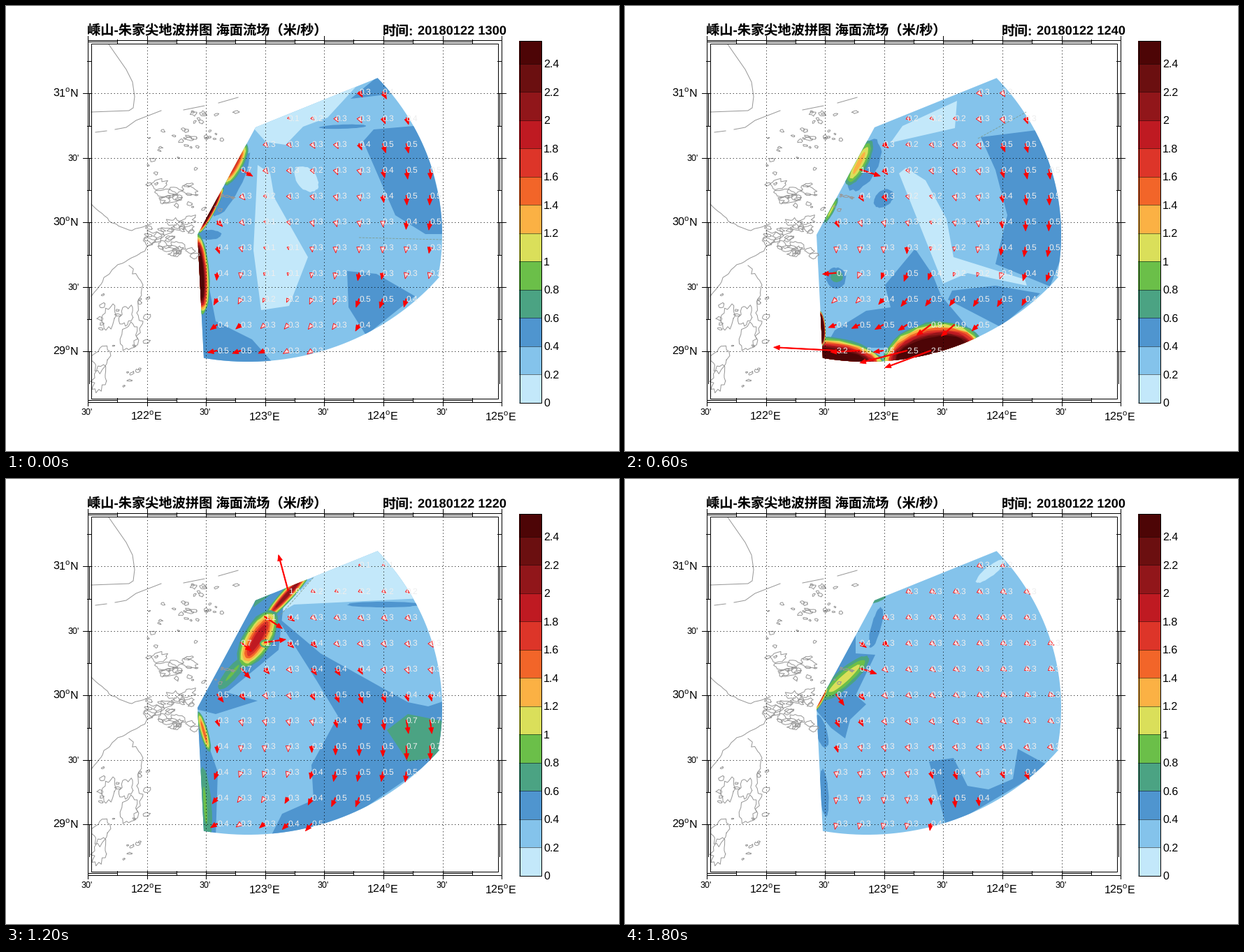
Animation of 877x638 px, one loop 2100 ms. Source, as a matplotlib script:

```python
import math
import random

import matplotlib.pyplot as plt
import numpy as np
from matplotlib.animation import ArtistAnimation
from matplotlib.collections import PolyCollection
from matplotlib.patches import Polygon, Rectangle

W, H, DPI = 877, 638, 64
PT = 72 / DPI
plt.rcParams.update({
    "font.family": ["Liberation Sans", "Noto Sans CJK JP"], "mathtext.fontset": "custom",
    "mathtext.rm": "Liberation Sans", "text.hinting": "none", "toolbar": "None",
})
COLORS = ["#c3e8fa", "#84c3eb", "#4f95cf", "#4ba383", "#6bbf49", "#dadf5a", "#fbb144",
          "#f26529", "#dd3529", "#bf1a22", "#91161a", "#6b0f10", "#4d0506"]
TOP = len(COLORS) - 1
GREY = "#979797"

fig = plt.figure(figsize=(W / DPI, H / DPI), dpi=DPI, facecolor="white")
ax = fig.add_axes([0, 0, 1, 1])
ax.set(xlim=(0, W), ylim=(H, 0))
ax.axis("off")
rng = random.Random(8)


def pairs(v):
    return np.array(v, float).reshape(-1, 2)


def line(*v, color="black", lw=1.0, z=5, **kw):
    p = pairs(v)
    return ax.plot(p[:, 0], p[:, 1], color=color, lw=lw * PT, zorder=z, **kw)


def text(x, y, s, px, ha="left", z=8, **kw):
    return ax.text(x, y, s, fontsize=px * PT, ha=ha, va="center_baseline", zorder=z, **kw)


def oval(x, y, rx, ry, tilt=0, rough=0.0, n=32):
    t = np.linspace(0, 2 * np.pi, n, endpoint=False)
    r = np.array([1 + rng.uniform(-rough, rough) for _ in t])
    c, s = math.cos(math.radians(tilt)), math.sin(math.radians(tilt))
    u, v = rx * r * np.cos(t), ry * r * np.sin(t)
    return np.column_stack([x + c * u - s * v, y + s * u + c * v])


# ---- coast ----
def coast(*v, wobble=0.0):
    p = pairs(v)
    out = []
    for a, b in zip(p, p[1:]):
        n = max(1, int(np.hypot(*(b - a)) / 5)) if wobble else 1
        for i in range(n):
            w = wobble if i else 0
            out += list(a + (b - a) * i / n + [rng.uniform(-w, w), rng.uniform(-w, w)])
    line(*out, *p[-1], color=GREY, z=4)


def islands(count, x, y, spread_x, spread_y, size):
    for _ in range(count):
        rx = size * rng.uniform(.3, 1)
        p = oval(rng.uniform(x - spread_x, x + spread_x), rng.uniform(y - spread_y, y + spread_y),
                 rx, rx * rng.uniform(.35, .8), rng.uniform(-30, 30), .4, 6 + int(rx))
        line(*p.flat, *p[0], color=GREY, z=4)


def draw_coast():
    coast(147, 55, 172, 91, 181, 109, 184, 130, 182, 146, 176, 150, 122, 152)
    coast(128, 181, 144, 179)
    coast(156, 177, 172, 174, 186, 164, 222, 150)
    coast(254, 149, 284, 143)
    coast(304, 139, 332, 131)
    coast(122, 284, 152, 311, 180, 322, 208, 312, wobble=1)
    coast(222, 330, 190, 356, 152, 378, 122, 416, wobble=2)
    coast(176, 372, 196, 400, 187, 440, 196, 452, 184, 488, wobble=3)
    for x, y, r in ((148, 446, 11), (172, 444, 10), (177, 474, 13), (136, 505, 14), (134, 535, 12)):
        p = oval(x, y, r * .8, r * 1.4, 15, .3, 20)
        coast(*p.flat, *p[0], wobble=1)
    islands(9, 242, 268, 26, 16, 13)
    islands(26, 236, 333, 36, 28, 11)
    islands(22, 290, 175, 45, 28, 5)
    islands(26, 255, 235, 55, 60, 4)
    islands(14, 165, 450, 40, 40, 5)
    islands(6, 182, 535, 14, 16, 4)
    islands(5, 315, 272, 12, 5, 4)


# ---- frame, grid and colour scale ----
def lon(d):
    return 116 + (d - 121.5) * 169.2


def lat(d):
    return 124 + (31 - d) * 185.2


def box(x0, y0, x1, y1):
    ax.add_patch(Rectangle((x0, y0), x1 - x0, y1 - y0, fill=False, lw=PT, ec="black", zorder=6))


def draw_map():
    box(116.5, 48.5, 708.5, 567.5)
    box(121.5, 53.5, 703.5, 562.5)
    dots = dict(lw=1, ls=(0, (1, 3.6)), z=5)
    for i in range(8):
        x = round(lon(121.5 + i / 2)) + .5
        line(x, 562, x, 573)
        line(x, 43, x, 54)
        if 0 < i < 7:
            line(x, 54, x, 562, **dots)
        if i < 7:
            m = x + 42.5
            line(m, 562, m, 568)
            line(m, 48, m, 54)
            for y in (51, 565):
                line(x, y, m, y)
        if i % 2:
            text(x - 1, 587, rf"{121.5 + i / 2:.0f}$^{{\rm o}}$E", 16, "center")
        else:
            text(x - 1, 581, "30'", 12.5, "center")
    for i in range(5):
        y = round(lat(31 - i / 2)) + .5
        line(110, y, 122, y)
        line(703, y, 715, y)
        line(122, y, 703, y, **dots)
        for x in (119, 706):
            line(x, y, x, y + 46)
            line(x - 3, y - 46, x + 3, y - 46)
        if i % 2:
            text(105, y, "30'", 12.5, "right")
        else:
            text(104, y - 1, rf"{31 - i / 2:.0f}$^{{\rm o}}$N", 16, "right")


def draw_scale():
    for k, c in enumerate(COLORS):
        y = 568.5 - 40.5 * k
        top = max(49.5, y - 40.5)
        ax.add_patch(Rectangle((734, top), 32, y - top, fc=c, ec="none"))
        line(734, y, 766, y, lw=.5)
        text(769, y, f"{k / 5:g}", 16)
    box(734.5, 49.5, 765.5, 568.5)


# ---- radar sector: two stations, two range arcs ----
def arc(x, y, rx, ry, t0, t1):
    t = np.radians(np.linspace(t0, t1, 40))
    return np.column_stack([x + rx * np.cos(t), y + ry * np.sin(t)])


SECTOR = np.vstack([[(274, 328), (357, 174)], arc(274, 328, 350, 332, -42.6, 10.4),
                    arc(346, 174, 356, 336, 39.6, 100.2)])
sector = ax.add_patch(Polygon(SECTOR, fc="none", ec="none"))
SHORE, WEST = -62, 86  # tilt of the two landward edges
art, layers = [], []


def fill(k, p, speed=None):
    patch = ax.add_patch(Polygon(p, fc=COLORS[k], ec="none", zorder=2))
    patch.set_clip_path(sector)
    art.append(patch)
    layers.append((patch.get_path(), speed or .2 * k + .1))


def area(k, *v):
    fill(k, pairs(v))


def blob(k, x, y, rx, ry, tilt=0):
    fill(k, oval(x, y, rx, ry, tilt, .05))


def hill(x, y, rx, ry, tilt, speed, core=.25):
    """Nested bands rising to a fast core."""
    top = min(TOP, int(speed * 5 + .01))
    for k in range(3, top + 1):
        s = 1 - (1 - core) * (k - 3) / max(1, top - 3)
        fill(k, oval(x, y, rx * s ** .5, ry * s, tilt, .03), speed if k == top else None)


def seam(*v):
    art.extend(line(*v, color="#7d9a8c", lw=.8, z=3, ls=(0, (4, 2))))


def speed_at(x, y):
    def top_layer(px, py):
        return next(s for path, s in reversed(layers) if path.contains_point((px, py)))

    here = top_layer(x, y)
    if here > .6:
        return here
    ring = [top_layer(*(p + (sector_mid - p) * .02)) for p in oval(x, y, 22, 22, n=8)
            if sector.get_path().contains_point(p + (sector_mid - p) * .02)]
    return np.mean([here, here] + [min(s, .7) for s in ring])


sector_mid = SECTOR.mean(axis=0)


def t1300():
    area(0, 354, 175, 506, 110, 460, 160, 425, 173, 400, 199, 372, 195)
    area(0, 360, 228, 378, 240, 384, 275, 432, 360, 405, 430, 365, 436, 354, 350)
    blob(0, 430, 248, 21, 14, 50)
    area(2, 532, 101, 552, 126, 493, 133)
    blob(2, 482, 173, 34, 3, -2)
    area(2, 595, 171, 526, 177, 511, 194, 557, 300, 600, 327, 632, 327)
    area(2, 488, 380, 530, 384, 585, 416, 515, 472, 490, 432)
    area(2, 276, 405, 290, 400, 300, 452, 352, 478, 384, 514, 280, 514)
    blob(2, 290, 328, 18, 7)
    blob(2, 322, 256, 52, 13, SHORE)
    hill(328, 227, 34, 11, SHORE, 1.7)
    hill(293, 293, 38, 6, SHORE, 2.6)
    hill(277, 384, 58, 14, WEST, 2.6, .4)
    seam(505, 332, 624, 335)


def t1250():
    area(0, 450, 173, 541, 111, 592, 171)
    area(2, 354, 176, 532, 100, 541, 112, 440, 148)
    area(3, 468, 132, 532, 100, 541, 112)
    area(2, 401, 178, 595, 175, 625, 260, 545, 272, 510, 215, 410, 190)
    area(2, 500, 292, 625, 260, 640, 330, 560, 455, 482, 352)
    area(3, 618, 262, 640, 320, 620, 395, 578, 405, 619, 310)
    area(3, 511, 405, 605, 410, 545, 458)
    area(0, 395, 236, 412, 248, 440, 315, 440, 390, 400, 450, 370, 460, 362, 514, 278, 514, 278, 435,
         338, 406, 300, 362, 325, 350, 285, 330, 310, 312, 350, 318, 368, 278)
    area(0, 280, 318, 330, 238, 380, 250, 350, 300)
    blob(0, 448, 325, 50, 7, 60)
    hill(296, 287, 45, 9, SHORE, 2.6)
    hill(283, 376, 40, 18, 42, 2.6)
    hill(282, 417, 17, 9, WEST, .9)
    seam(483, 291, 540, 279, 616, 260)


def t1240():
    area(2, 509, 188, 605, 176, 640, 320, 608, 402, 530, 370, 547, 300, 530, 235)
    area(2, 468, 408, 530, 401, 594, 412, 537, 460, 462, 421)
    area(0, 380, 196, 397, 172, 475, 136, 472, 175)
    area(0, 392, 240, 402, 232, 430, 250, 460, 305, 470, 360, 572, 392, 575, 401, 490, 383, 455, 398)
    area(2, 415, 348, 440, 385, 452, 415, 500, 472, 470, 490, 286, 490, 300, 465, 345, 437, 380, 432, 372, 400)
    blob(2, 341, 228, 40, 20, SHORE)
    hill(335, 225, 36, 12, SHORE, 1.3)
    hill(295, 293, 20, 4, SHORE, 1.1)
    blob(2, 370, 276, 16, 11, -40)
    blob(2, 302, 390, 14, 15)
    blob(3, 303, 388, 9, 8)
    hill(440, 500, 72, 46, -12, 2.5, .55)
    hill(288, 510, 84, 35, 5, 3.2, .55)
    hill(279, 462, 26, 8, WEST, 2.6, .7)
    seam(505, 190, 574, 152)


def t1230():
    area(0, 350, 176, 455, 135, 443, 158, 567, 143, 620, 229, 500, 212, 372, 184)
    area(2, 418, 195, 614, 228, 640, 320, 620, 395, 530, 462, 482, 430, 497, 380, 570, 396, 593, 385,
         585, 345, 530, 292, 450, 240)
    area(3, 538, 219, 614, 228, 640, 300, 628, 348, 585, 295)
    area(2, 276, 420, 300, 420, 328, 455, 302, 514, 278, 514)
    blob(3, 283, 505, 14, 12, 45)
    area(2, 345, 514, 372, 470, 405, 443, 440, 450, 475, 492, 430, 508)
    blob(2, 313, 325, 40, 13, -6)
    blob(2, 335, 292, 32, 9, -20)
    blob(2, 322, 252, 70, 24, SHORE)
    hill(335, 218, 28, 10, SHORE, 1.5)
    hill(303, 276, 34, 8, SHORE, 2.2)


def t1220():
    area(0, 385, 196, 445, 136, 532, 100, 596, 171, 412, 180)
    blob(2, 540, 180, 52, 4)
    area(2, 385, 195, 450, 250, 575, 320, 604, 326, 640, 314, 620, 398, 495, 484, 378, 514, 395, 480,
         440, 460, 437, 410, 475, 340, 445, 290)
    area(3, 545, 360, 575, 337, 640, 350, 620, 398, 575, 405)
    area(2, 357, 172, 400, 152, 390, 245, 316, 306, 360, 318, 300, 337, 272, 330)
    area(3, 356, 174, 382, 163, 354, 184)
    hill(404, 164, 54, 9, -48, 2.0)
    hill(324, 278, 30, 9, -50, .9)
    hill(360, 229, 46, 21, -60, 1.9)
    hill(371, 236, 8, 6, 0, 1.3)
    area(2, 272, 331, 303, 420, 300, 514, 280, 514)
    hill(285, 468, 54, 9, WEST, .9)
    hill(283, 362, 30, 6, 74, 1.5)
    seam(390, 198, 440, 141)


def t1210():
    area(0, 379, 178, 390, 160, 438, 140, 470, 180, 420, 185)
    area(0, 468, 181, 572, 147, 602, 193)
    blob(2, 337, 243, 72, 38, SHORE)
    area(2, 274, 328, 375, 292, 342, 335, 312, 370)
    hill(312, 257, 82, 34, SHORE, 2.6)
    area(2, 272, 335, 302, 405, 328, 455, 318, 514, 278, 514)
    blob(3, 282, 425, 32, 9, WEST)
    hill(280, 368, 25, 9, WEST, 1.3)
    area(2, 368, 432, 400, 440, 445, 405, 465, 340, 500, 345, 525, 402, 612, 406, 537, 464, 362, 516)


def t1200():
    blob(0, 523, 132, 26, 7, -38)
    blob(2, 359, 213, 30, 7, -75)
    blob(3, 362, 173, 12, 3, -22)
    area(2, 272, 330, 330, 224, 330, 250, 358, 252, 330, 310, 345, 323, 322, 345, 315, 372, 295, 357)
    hill(314, 286, 46, 13, -42, 1.1, .4)
    hill(281, 315, 20, 4, SHORE, 1.6)
    area(2, 435, 405, 470, 400, 490, 440, 520, 445, 555, 430, 562, 387, 608, 412, 460, 500)
    blob(2, 285, 450, 34, 6, WEST)
    blob(2, 281, 362, 24, 8, 75)


# ---- current vectors ----
def vectors(west, east, turns):
    """Headings in degrees at the north, middle and south of each side."""
    heads, shafts = [], []
    for r in range(11):
        w, e = (np.interp(r, (0, 5, 10), side) for side in (west, east))
        for c in range(10):
            x, y = lon(122.6 + c / 5), 123 + 37.1 * r
            if not sector.get_path().contains_point((x, y)):
                continue
            v = speed_at(x, y)
            a = math.radians(turns.get((r, c), w + (e - w) * c / 9))
            size = max(3, 28 * v)
            h = min(8.5, size)
            d = np.array([math.cos(a), math.sin(a)])
            n = np.array([-d[1], d[0]])
            base = np.array([x, y])
            neck = base + (size - h) * d
            heads.append((v > .32, [base + size * d, neck + .4 * h * n, neck - .4 * h * n]))
            shafts.append([base + .7 * n, neck + .7 * n, neck - .7 * n, base - .7 * n])
            art.append(text(x, y, f"{v:.1f}", 12, color="#eeeeee", z=7))
    for p, fc in ((shafts, "red"), ([t for full, t in heads if full], "red"),
                  ([t for full, t in heads if not full], "#f6d5da")):
        art.append(ax.add_collection(PolyCollection(p, fc=fc, ec="red", lw=.8 * PT, zorder=6), autolim=False))


# clock, speed field, west and east headings, local turns by (row, column)
SCENES = [
    (1300, t1300, (30, 45, 168), (72, 98, 110), {(3, 1): 30}),
    (1250, t1250, (40, 30, 165), (66, 98, 125), {(7, 0): 181}),
    (1240, t1240, (10, 65, 183), (70, 92, 130), {(3, 1): 18, (7, 0): 175}),
    (1230, t1230, (5, 50, 158), (58, 88, 120), {(3, 1): 35}),
    (1220, t1220, (15, 52, 148), (30, 76, 108), {(1, 3): -105, (3, 2): -8}),
    (1210, t1210, (10, 52, 145), (40, 52, 90), {(3, 1): 19}),
    (1200, t1200, (15, 55, 102), (45, 18, 92), {(4, 1): 18}),
]

draw_coast()
draw_map()
draw_scale()
text(116, 34, "嵊山-朱家尖地波拼图 海面流场（米/秒）", 19.2, weight="bold")
text(539, 34, "时间:", 19, weight="bold")

frames = []
for clock, field, west, east, turns in SCENES:
    art, layers = [], []
    fill(1, pairs([0, 0, W, 0, W, H, 0, H]))
    field()
    vectors(west, east, turns)
    art.append(text(716, 34, f"20180122 {clock}", 18.3, "right", weight="bold"))
    frames.append(art)

anim = ArtistAnimation(fig, frames, interval=300, repeat=True, repeat_delay=0, blit=False)
plt.show()
```
